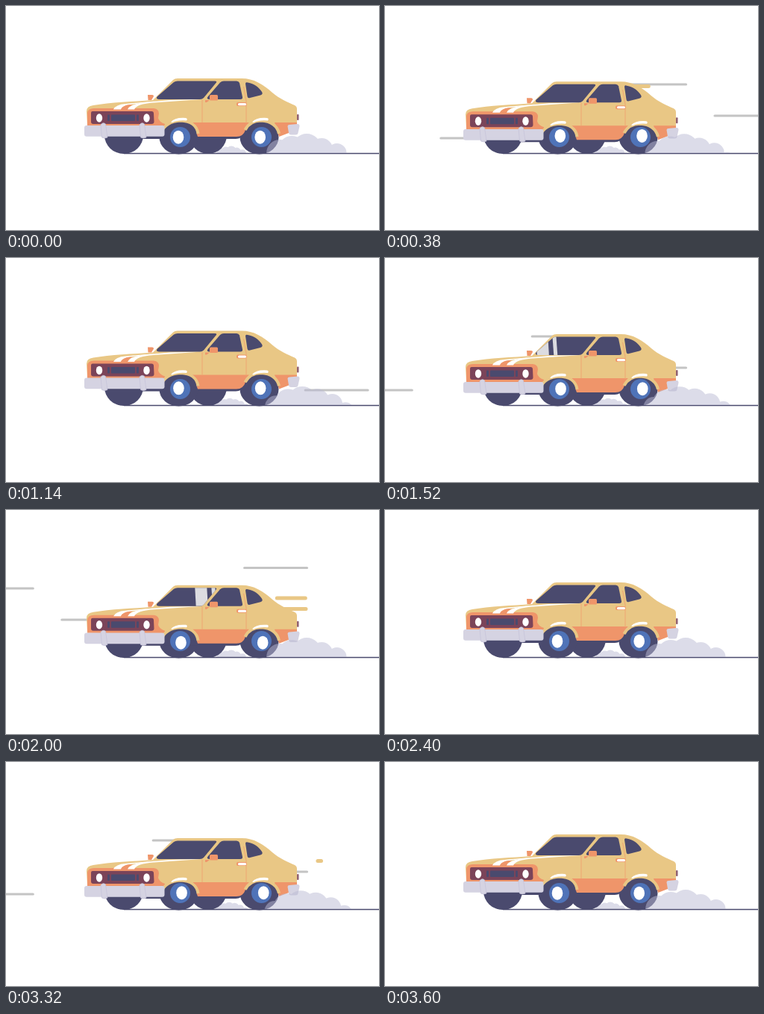
These frames come from a looping animation (500x300 px, 3620 ms). An HTML page:

```html
<!DOCTYPE html>
<html lang="en">
<head>
<meta charset="utf-8">
<title>Car on the road</title>
<style>
  html, body { margin: 0; height: 100%; overflow: hidden; background: #fff; }
  svg { display: block; width: 500px; height: 300px; }
  .dark { fill: #4a4a6e; }
  .yellow { fill: #e9c785; }
  .orange { fill: #ef956a; }
  .white { fill: #fff; }
  .maroon { fill: #7b4459; }
  .chrome { fill: #d5d3e2; }
  .blue { fill: #4f73b8; }
  .smoke { fill: #b9b9d4; fill-opacity: .5; }
  .seam { fill: none; stroke: #efa573; }
  .arch { fill: #4a4a6e; stroke: #e9c785; stroke-width: 4; }
  .shine { fill: none; stroke: #dcdce0; }
</style>
</head>
<body>
<svg viewBox="0 0 500 300">
  <defs>
    <clipPath id="aboveGround"><rect width="500" height="197"/></clipPath>
    <path id="windshield" d="M203 121 L225 102 Q227 100.500 230 100.500 H280 Q283.500 100.500 281.500 103 L265 123 Q263 125 260 125 H205 Q200 124.500 203 121Z"/>
    <clipPath id="glass"><use href="#windshield"/></clipPath>
  </defs>

  <g id="lines"></g>
  <g clip-path="url(#aboveGround)"><path id="smallSmoke" class="smoke" transform="translate(152.900 124.100) scale(.37)"/></g>

  <g class="dark">
    <ellipse cx="158" cy="173" rx="26" ry="25"/>
    <ellipse cx="271" cy="173" rx="25" ry="25"/>
    <ellipse cx="231.500" cy="176" rx="26" ry="22.500"/>
    <ellipse cx="339.500" cy="176" rx="26" ry="22.500"/>
  </g>

  <g id="body">
    <path class="dark" d="M180 168 H315 V176 Q312 178 308 178 H180Z"/>
    <path class="yellow" d="M108 141 Q108 134 117 133 C140 129 170 128 197 126 L224 99 Q226 97 230 97 H316 C332 97 345 105 357 116 C366 124 378 129 387 133 Q390 134.500 390 138 V158 H366 L320 160 H258 L210 160 H109Z"/>
    <path class="orange" d="M109 161 V143 Q110 137 118 137 H198 Q205 138 205 144 L204 150 Q205 155 213 158 V162Z"/>
    <path class="orange" d="M250 156 H326 L321 166 Q318 175 309 175 H257Z"/>
    <path class="orange" d="M360 156 H390 V162 L379 170 L366 175Z"/>

    <path class="white" d="M144 138.500 Q147 132 160 131 L205 127 L170 131.500 Q156 133 154 138.500Z"/>
    <path class="orange" d="M154 138.500 Q156 133 166 132 L170 132 Q165 134 163 138.500Z"/>
    <path class="white" d="M163 138.500 Q166 132 182 129.500 L220 126 L262 125 L198 129.500 Q175 131 172 138.500Z"/>

    <use href="#windshield" class="dark"/>
    <g clip-path="url(#glass)"><g id="shine" class="shine">
      <path d="M210 95 L212 130" stroke-width="16"/>
      <path d="M226.500 95 L229 130" stroke-width="5"/>
    </g></g>
    <path class="dark" d="M271 121 L287 102.500 Q289 100.500 292 100.500 H309 Q312 100.500 313 103 L317 122 Q317.500 125 314 125 H272 Q268 124.500 271 121Z"/>
    <path class="dark" d="M321 104 Q321 101.500 324 102.500 C333 104 339 109 343 115 Q345 118 341 119.500 L327 123 Q324 124 323.500 121Z"/>
    <path class="seam" d="M263 125.500 V156 M318.500 108 L322 127 V157"/>

    <path class="orange" d="M190 119 H196 Q198 119 198 121 L195 126 H190.500Z"/>
    <rect class="orange" x="273" y="119" width="11" height="7.500" rx="1.500"/>
    <path class="orange" d="M267 126 H273 L269 129 H267Z"/>
    <rect class="orange" x="309" y="129" width="13.500" height="5" rx="2"/>
    <rect class="white" x="311" y="130" width="11" height="3.200" rx="1.500"/>
    <rect class="maroon" x="390" y="145" width="2.500" height="8" rx="1" opacity=".85"/>

    <path class="maroon" d="M116 141 H195 Q198 141 198 144 L198.500 155 Q198.500 158 195 158 H117 Q114 158 114 155 V143 Q114 141 116 141Z"/>
    <rect class="dark" x="141" y="145.500" width="32" height="8.500" rx="1"/>
    <rect class="dark" x="136" y="145.500" width="3" height="8.500" rx="1"/>
    <rect class="dark" x="175" y="145.500" width="3" height="8.500" rx="1"/>
    <ellipse class="white" cx="125" cy="150" rx="4.200" ry="5.800"/>
    <ellipse class="white" cx="188.500" cy="150" rx="4.200" ry="5.800"/>

    <path class="arch" d="M208 170 C211 160 221 154 234 153.500 C247 154 256 160 257.500 171"/>
    <path class="arch" d="M320.500 166 C325 157 333 153.500 342 153.500 C355 154 364 161 366 171"/>
    <path class="white" d="M221 155.500 Q226 149 241 150 Q244 151 242 153.500 Q230 152.500 223 156Z"/>
    <path class="white" d="M330 155.500 Q335 149 350 150 Q353 151 351 153.500 Q339 152.500 332 156Z"/>
  </g>

  <g id="bumpers" class="chrome">
    <rect x="105" y="160" width="107.500" height="14.800" rx="3"/>
    <g stroke="#c5c2d8" stroke-width=".7">
      <path d="M127 159 Q130 155 133.500 158 L136 176 Q132 178 128.500 176Z"/>
      <path d="M179 159 Q182 155 185.500 158 L188 176 Q184 178 180.500 176Z"/>
    </g>
    <path d="M377.500 161 Q377.500 159 380 159 L391 158 Q393.500 158 393.500 161 L391.500 170 Q391 172.500 388 172.500 H382 Q379.500 172.500 379 170Z"/>
  </g>

  <g class="blue">
    <circle cx="233.500" cy="175.500" r="13.500"/>
    <circle cx="342.500" cy="175.500" r="13.500"/>
  </g>
  <g id="hubs" class="white">
    <ellipse cx="233.300" cy="175.700" rx="7.300" ry="9"/>
    <ellipse cx="343" cy="175.700" rx="7.300" ry="9"/>
  </g>

  <path d="M158 197.500 H500" stroke="#4a4a6e" stroke-width="1.500"/>
  <g clip-path="url(#aboveGround)"><path id="bigSmoke" class="smoke"/></g>
</svg>
<script>
const LOOP = 3620, BEAT = 600;
const $ = id => document.getElementById(id);
const move = (id, x, y) => $(id).setAttribute('transform', `translate(${x} ${y})`);

function addLine(y, height, color) {
  const el = document.createElementNS('http://www.w3.org/2000/svg', 'rect');
  for (const [k, v] of Object.entries({ y: y - height / 2, height, rx: height / 2, fill: color }))
    el.setAttribute(k, v);
  $('lines').append(el);
  return (from, to) => {
    el.setAttribute('x', from);
    el.setAttribute('width', Math.max(0, to - from));
  };
}

// Wind: [y, delay]. Trails: [y, time, right end at that time, speed].
const wind = [[77.5, 0], [147, 120], [105, 180], [177, 300]]
  .map(([y, delay]) => ({ delay, draw: addLine(y, 3, '#c4c4c4') }));
const trails = [[107.5, 400, 370, .75], [118, 760, 373, .75], [132.5, 800, 404, .45]]
  .map(([y, at, end, speed]) => ({ at, end, speed, draw: addLine(y, 5, '#e9c785') }));

// Each puff passes through these circles [x, y, radius], one step per 200 ms.
const puffs = [[350, 205, 8], [367, 197, 18], [383, 192, 18], [403, 190, 19],
               [423, 192, 15], [443.5, 197, 13], [460, 207, 10]];

function smokePath(phase) {
  return puffs.slice(0, -1).map((a, i) => {
    const [x, y, r] = a.map((v, k) => v + (puffs[i + 1][k] - v) * phase);
    return `M${x - r} ${y}a${r} ${r} 0 1 1 ${2 * r} 0a${r} ${r} 0 1 1 ${-2 * r} 0Z`;
  }).join('');
}

function render(t) {
  const beat = t % BEAT, angle = 2 * Math.PI * beat / BEAT;
  const drop = (1 - Math.cos(angle)) / 2;
  move('body', 0, 5 * drop);
  move('bumpers', 0, 6 * drop);
  move('hubs', -2.3 * Math.cos(angle), 2.3 * Math.sin(angle));
  move('shine', (t - 1520) * .106, 0);

  for (const { delay, draw } of wind) {
    const x = -92 + 2.04 * (beat - delay);
    draw(x, x + 87);
  }
  for (const { at, end, speed, draw } of trails) {
    const right = end + speed * (t % (2 * BEAT) - at);
    draw(Math.max(300, right - 43), Math.min(425, right));
  }

  const smoke = smokePath(t % 200 / 200);
  $('bigSmoke').setAttribute('d', smoke);
  $('smallSmoke').setAttribute('d', smoke);
}

function frame() {
  render(performance.now() % LOOP);
  requestAnimationFrame(frame);
}
frame();
</script>
</body>
</html>
```
